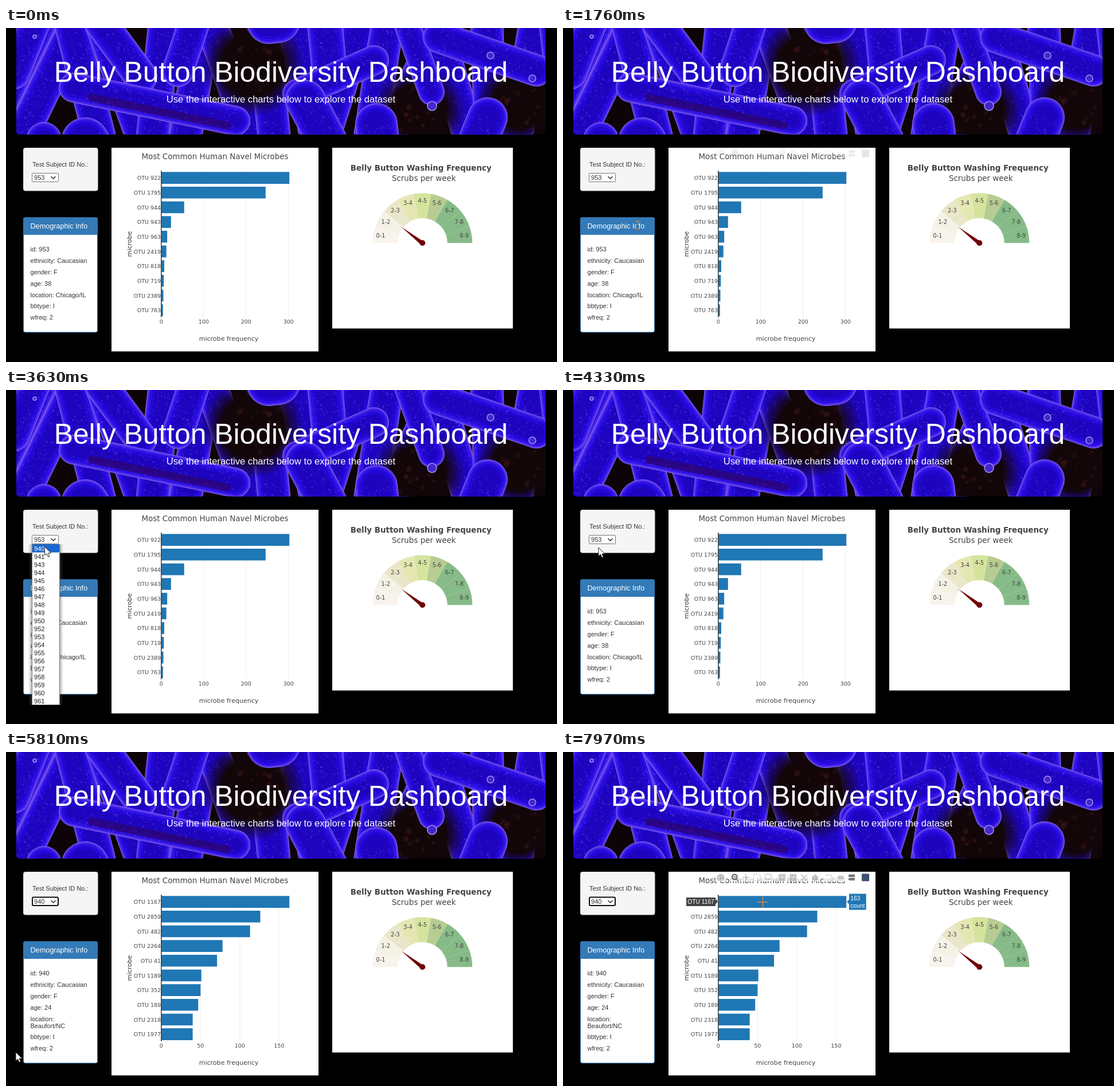
An HTML page with a canvas that plays this animation: 961x583 px, repeating every 8 s.

```html
<!DOCTYPE html>
<html lang="en">
<head>
<meta charset="utf-8">
<title>Biodiversity dashboard</title>
<style>
html, body { margin: 0; width: 100%; height: 100%; overflow: hidden; background: #000; }
canvas { display: block; }
</style>
</head>
<body>
<canvas id="stage" width="961" height="583"></canvas>
<script>
const LOOP = 8000;
const ctx = document.getElementById('stage').getContext('2d');
const ARIAL = '"Liberation Sans", Arial, sans-serif';
const VERDANA = '"DejaVu Sans", Verdana, sans-serif';
const BLUE = '#1f77b4';
const IDS = Array.from({ length: 22 }, (_, i) => 940 + i).filter(id => id !== 942 && id !== 951);

const subjects = {
  953: {
    otus: [922, 1795, 944, 943, 963, 2419, 818, 719, 2389, 763],
    counts: [302, 246, 54, 23, 14, 12, 7, 6, 5, 4],
    tick: 100, age: 38, place: ['location: Chicago/IL']
  },
  940: {
    otus: [1167, 2859, 482, 2264, 41, 1189, 352, 189, 2318, 1977],
    counts: [163, 126, 113, 78, 71, 51, 50, 47, 40, 40],
    tick: 50, age: 24, place: ['location:', 'Beaufort/NC']
  }
};

// time, x, y of the pointer
const path = [
  [747, 735, 575], [1530, 192, 352], [1758, 130, 344], [2370, 94, 278],
  [2690, 85, 261], [3400, 85, 261], [3630, 67, 274], [4030, 67, 274],
  [4324, 62, 275], [4760, 62, 275], [5280, 106, 340], [5570, 16, 366],
  [5801, 17, 524], [6110, 160, 520], [6430, 10, 566], [7045, 226, 356],
  [7270, 262, 258], [7580, 346, 261], [7900, 348.5, 262]
];

const clamp = v => Math.max(0, Math.min(1, v));
const ramp = (t, a, b) => clamp((t - a) / (b - a));

function pointer(t) {
  if (t < path[0][0]) return null;
  let i = path.findIndex(p => p[0] > t);
  if (i < 0) i = path.length;
  const a = path[i - 1], b = path[i] || a;
  const k = a === b ? 0 : ramp(t, a[0], b[0]);
  return { x: a[1] + (b[1] - a[1]) * k, y: a[2] + (b[2] - a[2]) * k };
}

function text(str, x, y, size, color = '#333', font = ARIAL, align = 'left', weight = '') {
  ctx.font = `${weight} ${size}px ${font}`;
  ctx.textAlign = align;
  ctx.fillStyle = color;
  ctx.fillText(str, x, y);
}

function box(x, y, w, h, fill, r = 0, stroke, lw = 1) {
  ctx.beginPath();
  ctx.roundRect(x, y, w, h, r);
  if (fill) { ctx.fillStyle = fill; ctx.fill(); }
  if (stroke) { ctx.strokeStyle = stroke; ctx.lineWidth = lw; ctx.stroke(); }
}

function poly(pts, fill, stroke, lw = 1) {
  ctx.beginPath();
  pts.forEach(p => ctx.lineTo(p[0], p[1]));
  if (fill) { ctx.closePath(); ctx.fillStyle = fill; ctx.fill(); }
  if (stroke) { ctx.strokeStyle = stroke; ctx.lineWidth = lw; ctx.stroke(); }
}

function disc(x, y, r, fill) {
  ctx.beginPath();
  ctx.arc(x, y, r, 0, 7);
  ctx.fillStyle = fill;
  ctx.fill();
}

function makeBanner() {
  const c = document.createElement('canvas');
  c.width = 961;
  c.height = 186;
  const g = c.getContext('2d');
  let seed = 7;
  const rnd = () => (seed = seed * 16807 % 2147483647) / 2147483647;

  const dot = (x, y, r, fill) => {
    g.fillStyle = fill;
    g.beginPath();
    g.arc(x, y, r, 0, 7);
    g.fill();
  };
  const streak = (x1, y1, x2, y2, w, color) => {
    g.strokeStyle = color;
    g.lineWidth = w;
    g.beginPath();
    g.moveTo(x1, y1);
    g.lineTo(x2, y2);
    g.stroke();
  };
  const rod = (x1, y1, x2, y2, w) => {
    ['#7a58f0', '#4a2ae8', '#2c0fe4', '#2206d2', '#1e04be'].forEach((color, i) => {
      const inset = i * (i + 1) * 1.4;
      if (w > inset) streak(x1, y1, x2, y2, w - inset, color);
    });
    const len = Math.hypot(x2 - x1, y2 - y1);
    for (let i = 0; i < len * w / 45; i++) {
      const k = rnd(), off = (rnd() - 0.5) * w * 0.85;
      dot(x1 + (x2 - x1) * k - (y2 - y1) / len * off,
        y1 + (y2 - y1) * k + (x2 - x1) / len * off,
        0.7 + rnd(), `rgba(110,80,255,${rnd() * 0.4})`);
    }
  };

  g.beginPath();
  g.roundRect(18, -10, 923, 195.5, 5);
  g.clip();
  g.fillStyle = '#0d0407';
  g.fillRect(0, 0, 961, 186);
  g.lineCap = 'round';

  // A deeper layer of rods, then shadowy gaps between them.
  for (let x = 10; x < 980; x += 64) {
    const lean = (rnd() - 0.5) * 110;
    rod(x - lean, -20, x + lean, 205, 58);
  }
  for (const [x, y, r] of [[430, 65, 90], [720, 145, 80], [895, 130, 75]]) {
    const shade = g.createRadialGradient(x, y, r * 0.6, x, y, r);
    shade.addColorStop(0, '#120609');
    shade.addColorStop(1, 'rgba(18,6,9,0)');
    g.fillStyle = shade;
    g.fillRect(x - r, y - r, r * 2, r * 2);
    for (let i = 0; i < 25; i++) {
      dot(x + (rnd() - 0.5) * r, y + (rnd() - 0.5) * r, 1 + rnd() * 4, `rgba(75,28,30,${rnd() * 0.45})`);
    }
  }

  // x1, y1, x2, y2, width
  [
    [14, 80, 55, -20, 54], [165, -10, 235, 85, 58], [330, -15, 300, 75, 56],
    [458, -10, 475, -12, 76], [556, -10, 565, 85, 62], [698, -10, 742, 112, 46],
    [646, 168, 652, 220, 74], [508, 115, 642, 56, 52], [522, 125, 575, 225, 70],
    [118, 104, 400, 162, 52], [755, 16, 925, 74, 56], [840, 156, 812, 225, 70],
    [66, 195, 62, 230, 62], [138, 198, 160, 235, 84]
  ].forEach(r => rod(...r));
  streak(150, 122, 385, 170, 14, 'rgba(50,4,70,.5)');
  for (const [x, y, r] of [[845, 48, 6], [918, 88, 6], [743, 136, 8], [50, 15, 3]]) {
    dot(x, y, r + 0.8, '#a48cf5');
    dot(x, y, r - 0.8, '#4428cc');
  }
  return c;
}
const banner = makeBanner();

function drawHeader() {
  ctx.drawImage(banner, 0, 0);
  text('Belly Button Biodiversity Dashboard', 479.5, 94, 49.8, '#fff', ARIAL, 'center');
  text('Use the interactive charts below to explore the dataset', 479.5, 130, 16.6, '#fff', ARIAL, 'center');
}

function drawSelect(id, focused) {
  box(30.5, 209.5, 129.5, 74.5, '#f5f5f5', 3, '#e3e3e3');
  text('Test Subject ID No.:', 46, 242, 11.05);
  if (focused) box(46, 253.5, 45, 14.5, '#fff', 2, '#101010', 2);
  else box(45.5, 253.5, 46, 15, '#fff', 1, '#767676');
  text(id, 49, 264.5, 11.05);
  poly([[78.5, 259.3], [82.5, 263], [86.5, 259.3]], null, '#222', 1.4);
}

function drawInfo(id, d) {
  const extra = (d.place.length - 1) * 12;
  box(30.5, 331, 129, 200 + extra, '#fff', 3, '#337ab7');
  box(30, 330.5, 130, 30.5, '#337ab7', [3, 3, 0, 0]);
  text('Demographic Info', 42.5, 350, 12.64, '#fff');
  let y = 390.3;
  const line = (s, step = 19.8) => { text(s, 42.5, y, 11.05); y += step; };
  line('id: ' + id);
  line('ethnicity: Caucasian');
  line('gender: F');
  line('age: ' + d.age);
  d.place.forEach((s, i) => line(s, i < d.place.length - 1 ? 12 : 19.8));
  line('bbtype: I');
  line('wfreq: 2');
}

const X0 = 270.8, ROW = 25.67;
const rowY = i => 261.6 + i * ROW;
const unit = d => 223.4 / d.counts[0];

function drawBars(d) {
  const k = unit(d);
  box(184, 209, 361, 355.6, '#fff');
  text('Most Common Human Navel Microbes', 364.5, 229, 13.43, '#444', VERDANA, 'center');
  for (let v = 0; v * k < 233; v += d.tick) {
    const x = X0 + v * k;
    if (v) box(x - 0.5, 249, 1, 256, '#eee');
    text(v, x, 516, 9.48, '#444', VERDANA, 'center');
  }
  d.counts.forEach((n, i) => {
    box(X0, rowY(i) - 10.3, n * k, 20.6, BLUE);
    text('OTU ' + d.otus[i], 270, rowY(i) + 3.6, 9.48, '#444', VERDANA, 'right');
  });
  box(270, 249, 1.6, 256, '#444');
  text('microbe frequency', 388.5, 546, 11.05, '#444', VERDANA, 'center');
  ctx.save();
  ctx.translate(218.5, 377);
  ctx.rotate(-Math.PI / 2);
  text('microbe', 0, 0, 11.05, '#333', VERDANA, 'center');
  ctx.restore();
}

// Label with a small arrow at x,y, growing to the side given by dir.
function callout(x, y, dir, w, h, fill) {
  const near = x + dir * 4, far = near + dir * w;
  poly([[x, y], [near, y - 4], [near, y - h], [far, y - h], [far, y + h], [near, y + h], [near, y + 4]], fill);
}

function drawHover(d, p) {
  const i = Math.floor((p.y - 249) / ROW);
  const end = X0 + (d.counts[i] || 0) * unit(d);
  if (i < 0 || !d.counts[i] || p.x < X0 || p.x > end) return;
  const y = rowY(i);
  callout(270, y, -1, 51, 7.5, '#444');
  text('OTU ' + d.otus[i], 217.2, y + 3.7, 10.27, '#fff');
  callout(end + 0.8, y, 1, 29.7, 14, BLUE);
  text(d.counts[i], end + 7, y - 3, 10.27, '#fff');
  text('count', end + 7, y + 10, 10.27, '#fff');
}

function drawGauge() {
  const cx = 726.3, cy = 375.3;
  const colors = ['#f8f3ec', '#f4f1e5', '#e9e6ca', '#e5e7b3', '#d5e49d', '#b7cc92', '#86bb88'];
  box(569, 209, 315, 315.6, '#fff');
  text('Belly Button Washing Frequency', 723.7, 248.5, 13.43, '#444', VERDANA, 'center', 'bold');
  text('Scrubs per week', 728.7, 266.5, 13.43, '#444', VERDANA, 'center');
  for (let i = 0; i < 9; i++) {
    const a = Math.PI * (1 + i / 9), b = a + Math.PI / 9, m = (a + b) / 2;
    ctx.beginPath();
    ctx.arc(cx, cy, 87, a, b);
    ctx.arc(cx, cy, 43.5, b, a, true);
    ctx.fillStyle = colors[Math.min(i, 6)];
    ctx.fill();
    text(`${i}-${i + 1}`, cx + 74 * Math.cos(m), cy + 74 * Math.sin(m) + 3.7, 9.6, '#444', VERDANA, 'center');
  }
  poly([[689.5, 347.2], [728.5, 373], [724, 378.5]], '#700000');
  disc(cx, cy, 5, '#700000');
}

// Each icon is drawn around 0,0 in a 12 px square.
const line = (...pts) => poly(pts, null, '#444', 1.8);
const tag = (y, h) => poly([[-6, y], [-3, y - h], [6, y - h], [6, y + h], [-3, y + h]], '#444');
const dashed = paint => {
  ctx.setLineDash([2, 1.7]);
  paint();
  ctx.setLineDash([]);
};
const sign = plus => {
  box(-6, -6, 12, 12, '#444', 1);
  box(-4, -1, 8, 2, '#fff');
  if (plus) box(-1, -4, 2, 8, '#fff');
};
const camera = () => {
  box(-6.5, -4, 13, 9.5, '#444', 1.5);
  box(-3, -6, 6, 3, '#444');
  disc(0, 0.7, 3.2, '#fff');
  disc(0, 0.7, 1.8, '#444');
};
const zoom = () => {
  line([2, 2], [6, 6.5]);
  disc(-0.5, -1, 5.5, '#444');
  box(-3.5, -4, 6, 6, '#fff', 2);
  box(-2, -1.5, 3, 1.2, '#444');
};
const pan = () => {
  line([-6, 0], [6, 0]);
  line([0, -6], [0, 6]);
};
const select = () => dashed(() => box(-5.5, -5.5, 11, 11, null, 0, '#444', 1.6));
const lasso = () => {
  box(-5.5, -5.5, 12, 8, null, 4, '#444', 1.4);
  line([-4, 1], [-3, 5]);
};
const fit = () => {
  line([-5, -5], [5, 5]);
  line([5, -5], [-5, 5]);
  disc(0, 0, 2, '#fff');
};
const home = () => poly([[0, -6], [6.5, 0], [4.5, 0], [4.5, 5], [-4.5, 5], [-4.5, 0], [-6.5, 0]], '#444');
const spikes = () => dashed(() => line([-6, -4], [4, -4], [4, 6]));
const nearest = () => tag(0, 3);
const compare = () => { tag(-3, 2.2); tag(3, 2.2); };
const logo = () => box(-6.5, -6.5, 13, 13, '#3f4f75', 1);

const barTools = [[camera], [zoom, pan, select, lasso],
  [() => sign(true), () => sign(false), fit, home], [spikes, nearest, compare], [logo]];
const gaugeTools = [[camera], [logo]];

// Groups of icons, laid out from the right edge.
function drawTools(alpha, right, groups) {
  if (!alpha) return;
  let x = right;
  for (const icon of groups.flatMap(group => [...group, null]).reverse()) {
    if (!icon) { x -= 5.5; continue; }
    const strong = icon === zoom || icon === compare;
    ctx.save();
    ctx.translate(x, 219);
    ctx.globalAlpha = alpha * 0.7;
    box(-9.5, -7, 19, 14, '#fff');
    ctx.globalAlpha = alpha * (icon === logo ? 1 : strong ? 0.75 : 0.3);
    icon();
    ctx.restore();
    x -= 19.2;
  }
}

function drawMenu(t, p) {
  const out = 1 - ramp(t, 4030, 4180);
  const shade = ramp(t, 2960, 3050) * out, body = ramp(t, 3030, 3120) * out;
  if (!shade) return;
  ctx.save();
  ctx.globalAlpha = shade * 0.4;
  for (const [x, dir] of [[45, -1], [94, 1]]) {
    const g = ctx.createLinearGradient(x, 0, x + dir * 6, 0);
    g.addColorStop(0, '#555');
    g.addColorStop(1, 'rgba(85,85,85,0)');
    box(Math.min(x, x + dir * 6), 269, 6, 281, g);
  }
  ctx.globalAlpha = body;
  box(45.5, 269.5, 48, 280, '#fff', 0, '#767676');
  const hot = p.y > 269 ? Math.floor((p.y - 269) / 14) : IDS.indexOf(953);
  IDS.forEach((id, i) => {
    const y = 269.5 + i * 14;
    if (i === hot) box(46, y, 47, 14, '#1967d2');
    text(id, 49, y + 11, 11.05, i === hot ? '#fff' : '#222');
  });
  ctx.restore();
}

function drawPointer({ x, y }) {
  const inPlot = x > 271 && x < 505 && y > 249 && y < 505;
  const inPanel = x > 40 && x < 160 && y > 335 && y < 531;
  ctx.save();
  ctx.translate(x, y);
  if (inPlot || inPanel) ctx.globalCompositeOperation = 'difference';
  if (inPlot) {
    box(-9.5, -0.8, 19, 1.6, '#fff');
    box(-0.8, -9.5, 1.6, 8.7, '#fff');
    box(-0.8, 0.8, 1.6, 8.7, '#fff');
  } else if (inPanel) {
    box(-0.7, -6, 1.4, 12, '#fff');
    box(-4, -7.4, 8, 1.4, '#fff');
    box(-4, 6, 8, 1.4, '#fff');
  } else {
    poly([[0, 0], [0, 15], [3.5, 12], [6, 17.5], [8.5, 16.5], [6, 11], [11, 11], [0, 0]],
      '#fff', '#222');
  }
  ctx.restore();
}

function draw(t) {
  const id = t < 4420 ? 953 : 940, d = subjects[id];
  // The pointer moves in steps, as a screen recorder catches it.
  const p = pointer(7045 + Math.floor((t - 7045) / 77.75) * 77.75);
  ctx.fillStyle = '#000';
  ctx.fillRect(0, 0, 961, 583);
  drawHeader();
  drawSelect(id, t >= 4420);
  drawInfo(id, d);
  drawBars(d);
  drawGauge();
  drawTools(ramp(t, 1150, 1450) * (1 - ramp(t, 1530, 1800)) + ramp(t, 6850, 7110), 533, barTools);
  drawTools(ramp(t, 800, 1000) * (1 - ramp(t, 1080, 1300)), 872, gaugeTools);
  if (!p) return;
  drawHover(d, p);
  drawMenu(t, p);
  if ((t >= 2840 && t < 3150) || (t >= 3860 && t < 4100)) disc(p.x - 0.5, p.y, 11.5, 'rgba(255,247,0,.6)');
  drawPointer(p);
}

const start = performance.now();
function tick() {
  draw((performance.now() - start) % LOOP);
  requestAnimationFrame(tick);
}
tick();
</script>
</body>
</html>
```
